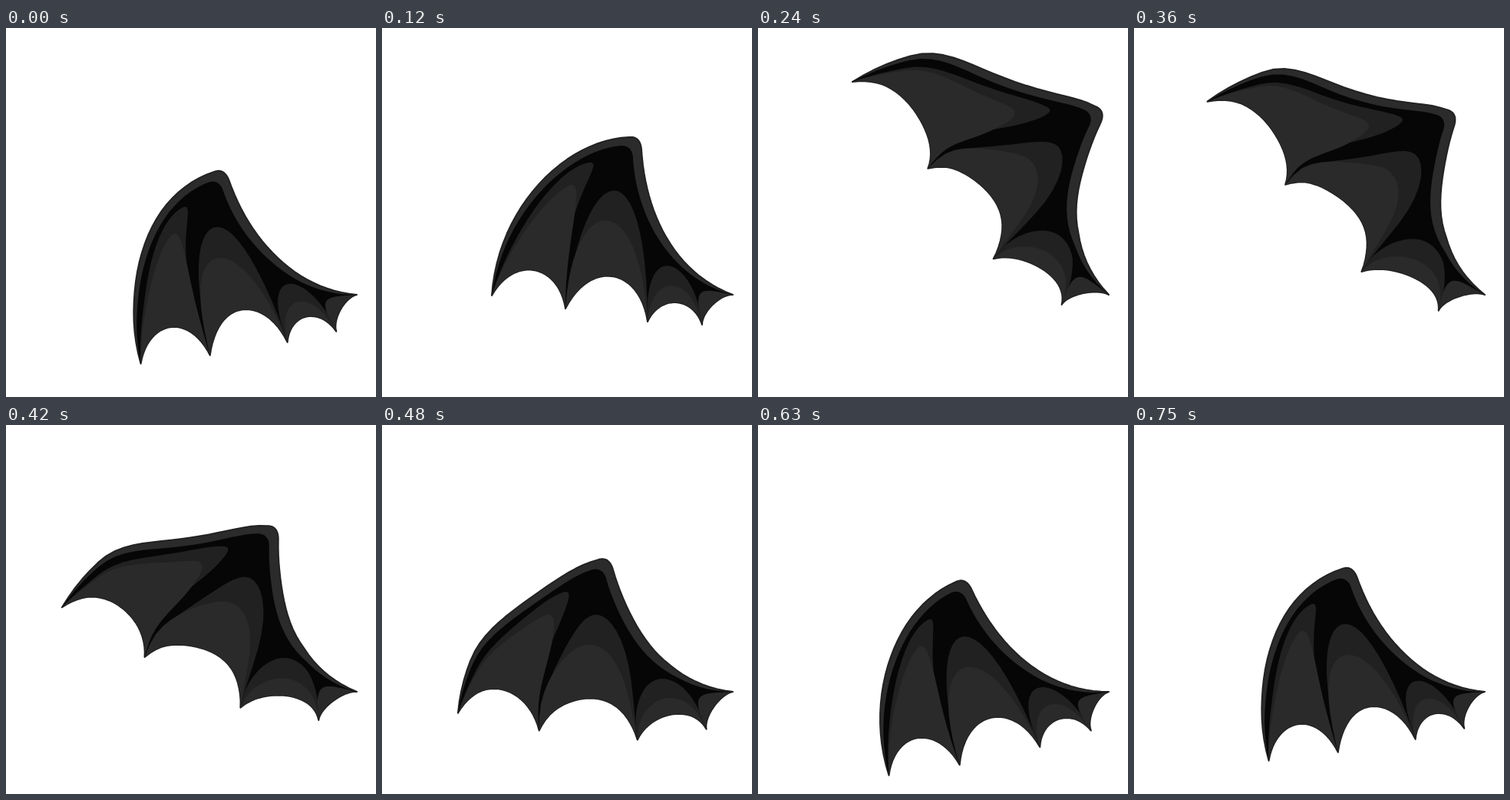
These frames come from a looping animation (482 px wide and 480 px high, 0.78 s). An HTML page with a canvas:

```html
<!DOCTYPE html>
<html lang="en">
<head>
<meta charset="utf-8">
<title>Wing</title>
<style>
  html, body { margin: 0; width: 100%; height: 100%; overflow: hidden; background: #fff; }
  canvas { display: block; }
</style>
</head>
<body>
<canvas id="stage" width="482" height="480"></canvas>
<script>
const ctx = document.getElementById('stage').getContext('2d');
const LOOP = 780, CYCLE = 750, STEP = 30, KEY_GAP = 120;
const ROOT = [457, 347], ARM = 234, SAMPLES = 24;

// Directions in degrees above "left", keyed every KEY_GAP
const ARM_KEYS = [42.6, 58.6, 88, 80.5, 46.4, 37.6];
const HAND_KEYS = [-66.3, -46.3, 7.5, 3.6, -45.1, -66.5];
const REST = { arm: ARM_KEYS[1], hand: HAND_KEYS[1] };

// Finger tips at rest and how far each follows the hand instead of the arm
const TIPS = [
  { at: [143, 348], follow: 1 },
  { at: [239, 365], follow: .81 },
  { at: [346, 382], follow: .43 },
  { at: [417, 386], follow: .07 },
  { at: ROOT, follow: 0 }
];
const SAGS = [42, 51, 27, 9];   // height of the scallop after each tip

// Cubic contours at rest, running from one tip to another
const SHAPES = [
  { color: '#2b2b2b', from: 0, to: 4, contour:
    '151,232 240,145 322,142 332,141 337,147 338,158 343,240 380,318' },
  { color: '#060606', from: 0, to: 4, contour:
    '158,238 245,158 312,153 322,153 327,160 327,170 331,240 372,325' },
  { color: '#212121', from: 0, to: 1, contour: '165,275 225,182 270,175 295,173 225,235' },
  { color: '#2a2a2a', from: 0, to: 1, contour: '165,280 222,212 246,204 266,202 238,280' },
  { color: '#212121', from: 1, to: 2, contour: '262,175 345,140' },
  { color: '#2a2a2a', from: 1, to: 2, contour: '248,215 335,203' },
  { color: '#212121', from: 2, to: 3, contour: '340,270 408,300' },
  { color: '#2a2a2a', from: 2, to: 3, contour: '350,320 402,318' },
  { color: '#292929', from: 3, to: 4, contour: '405,335 414,338' }
];

const clamp = v => Math.min(1, Math.max(0, v));
const smoothstep = (a, b, v) => {
  const u = clamp((v - a) / (b - a));
  return u * u * (3 - 2 * u);
};
const polar = ([x, y], distance, degrees) => {
  const a = degrees * Math.PI / 180;
  return [x - distance * Math.cos(a), y - distance * Math.sin(a)];
};
const elbowAt = arm => polar(ROOT, ARM, arm);

// Cyclic Catmull-Rom
function keyed(keys, t) {
  const n = keys.length, i = Math.min(n - 1, Math.floor(t / KEY_GAP));
  const gap = i === n - 1 ? CYCLE - i * KEY_GAP : KEY_GAP;
  const u = (t - i * KEY_GAP) / gap;
  const [a, b, c, d] = [n - 1, 0, 1, 2].map(k => keys[(i + k) % n]);
  return b + u / 2 * (c - a + u * (2 * a - 5 * b + 4 * c - d + u * (3 * (b - c) + d - a)));
}

// Position of a rest point seen from the elbow
function fromElbow([x, y]) {
  const [ex, ey] = elbowAt(REST.arm);
  return { r: Math.hypot(x - ex, y - ey), angle: Math.atan2(ey - y, ex - x) * 180 / Math.PI };
}
const fan = TIPS.map(({ at, follow }) => ({ follow, spread: REST.hand - fromElbow(at).angle }));

// Bind a rest point: near the elbow it stays with the arm, farther out it fans with the fingers
function bind(point) {
  const { r, angle } = fromElbow(point);
  const spread = REST.hand - angle;
  let follow = 1;
  for (let i = 1; i < fan.length; i++) {
    const u = clamp((spread - fan[i - 1].spread) / (fan[i].spread - fan[i - 1].spread));
    follow += u * (fan[i].follow - fan[i - 1].follow);
  }
  return {
    r, angle,
    follow: follow * smoothstep(40, 220, r),
    stretch: clamp(1 - spread / fan[1].spread) * smoothstep(40, 150, r)
  };
}

// Samples along a chain of cubics: start, control, control, end, ...
function sample(pts) {
  const out = [];
  for (let i = 0; i + 3 < pts.length; i += 3) {
    const [a, b, c, d] = pts.slice(i, i + 4);
    for (let k = 0; k <= SAMPLES; k++) {
      const u = k / SAMPLES, v = 1 - u;
      out.push([0, 1].map(j =>
        v * v * v * a[j] + 3 * u * v * v * b[j] + 3 * u * u * v * c[j] + u * u * u * d[j]));
    }
  }
  return out;
}

function scallop(i) {
  const [ax, ay] = TIPS[i].at, [bx, by] = TIPS[i + 1].at;
  const dx = bx - ax, dy = by - ay, k = SAGS[i] / .75 / Math.hypot(dx, dy);
  const control = u => [ax + dx * u + dy * k, ay + dy * u - dx * k];
  return sample([[bx, by], control(.8), control(.2), [ax, ay]]);
}

const shapes = SHAPES.map(({ color, from, to, contour }) => {
  const middle = contour.split(' ').map(p => p.split(',').map(Number));
  const points = sample([TIPS[from].at, ...middle, TIPS[to].at]);
  for (let i = to - 1; i >= from; i--) points.push(...scallop(i));
  return { color, points: points.map(bind) };
});

function draw(t) {
  const arm = keyed(ARM_KEYS, t), hand = keyed(HAND_KEYS, t);
  const elbow = elbowAt(arm);
  const armTurn = arm - REST.arm, handTurn = hand - REST.hand;
  const reach = handTurn * (.0018 + .00003 * handTurn);

  ctx.fillStyle = '#fff';
  ctx.fillRect(0, 0, 482, 480);
  ctx.lineJoin = 'round';
  ctx.lineWidth = 2;
  ctx.strokeStyle = '#222';
  shapes.forEach(({ color, points }, index) => {
    ctx.beginPath();
    for (const { r, angle, follow, stretch } of points) {
      const turn = armTurn + (handTurn - armTurn) * follow;
      ctx.lineTo(...polar(elbow, r * (1 + reach * stretch), angle + turn));
    }
    ctx.closePath();
    ctx.fillStyle = color;
    ctx.fill();
    if (index === 0) ctx.stroke();
  });
}

function tick() {
  const t = Math.floor(performance.now() % LOOP / STEP) * STEP;
  draw(t % CYCLE);
  requestAnimationFrame(tick);
}
tick();
</script>
</body>
</html>
```
